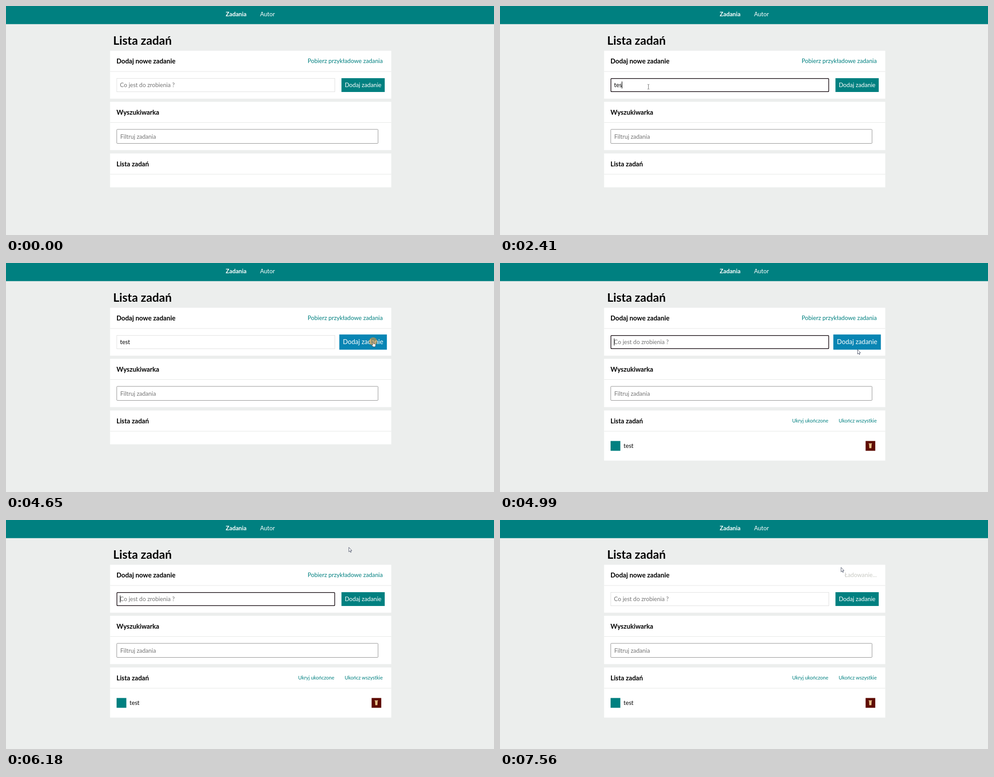
Write an HTML page that moves like this. It is 1090 px wide and 514 px high and loops after 8000 ms.

```html
<!DOCTYPE html>
<html lang="pl">
<head>
<meta charset="utf-8">
<title>Lista zadań</title>
<style>
html, body { margin: 0; width: 100%; height: 100%; overflow: hidden; background: #eceeed; }
svg { display: block; width: 100%; height: 100%; }
text { font: 13.2px Lato, sans-serif; white-space: pre; }
.nav { fill: #fff; }
.bold { font-weight: 700; }
.h1 { font-size: 26.5px; font-weight: 700; }
.h2 { font-size: 14.65px; font-weight: 700; }
.hint { font-size: 13.05px; fill: #757575; }
.end { text-anchor: end; }
.small { font-size: 11px; fill: #008080; text-anchor: end; }
.line { fill: #e4e6e5; }
</style>
</head>
<body>
<svg viewBox="0 0 1090 514">
  <rect width="1090" height="514" fill="#eceeed"/>
  <rect width="1090" height="40.7" fill="#008080"/>
  <text class="nav bold" x="490.8" y="23.2">Zadania</text>
  <text class="nav" x="567.5" y="23.2">Autor</text>
  <text class="h1" x="239.2" y="86.6">Lista zadań</text>

  <g fill="#fff">
    <rect x="232.5" y="100.5" width="628" height="107.5"/>
    <rect x="232.5" y="215" width="628" height="108.5"/>
    <rect id="panel" x="232.5" y="331" width="628"/>
  </g>
  <rect class="line" x="232.5" y="146.5" width="628" height="1"/>
  <rect class="line" x="232.5" y="261" width="628" height="1"/>
  <rect class="line" x="232.5" y="377" width="628" height="1"/>

  <text class="h2" x="246.8" y="129.2">Dodaj nowe zadanie</text>
  <text class="h2" x="246.8" y="243.8">Wyszukiwarka</text>
  <text class="h2" x="246.8" y="359.6">Lista zadań</text>
  <text id="link" class="end" x="841.5" y="128"></text>

  <rect id="field" fill="#fff"/>
  <text id="hint" class="hint" x="254.6" y="182">Co jest do zrobienia ?</text>
  <text id="typed" x="254.8" y="182"></text>
  <rect id="caret" y="169.5" width="1.2" height="15.5"/>

  <g id="button">
    <rect id="face" x="749.3" y="162" width="96.6" height="31"/>
    <text class="nav" x="797.6" y="182" text-anchor="middle">Dodaj zadanie</text>
  </g>

  <rect x="247.4" y="276.9" width="583.6" height="31.6" rx="1.5" fill="#fff" stroke="#808080" stroke-width=".9"/>
  <text class="hint" x="255.2" y="297.6">Filtruj zadania</text>

  <g id="item">
    <text class="small" x="733.3" y="357.6">Ukryj ukończone</text>
    <text class="small" x="841.5" y="357.6">Ukończ wszystkie</text>
    <rect x="247" y="399.5" width="21.8" height="22" fill="#008080"/>
    <text x="276" y="415.4">test</text>
    <rect x="816.6" y="399.5" width="21.6" height="22" fill="#5e0c02"/>
    <path d="M824.2 406h6l-.6 9.8h-4.8z" fill="#d9a866"/>
    <path d="M823.4 405.4h7.6M825.8 407l.3 8M828.6 407l-.3 8" stroke="#f6e3bd"/>
  </g>

  <circle id="press" r="9.2" fill="#f79628" fill-opacity=".53"/>
  <g id="pointer">
    <path id="arrow" d="M-.2 .4V10.4L2.1 8.3L3.7 11.7L5.1 11L3.6 7.7H6.6Z" fill="#fff" stroke="#27304a" stroke-width=".8"/>
    <path id="beam" d="M-2 -5H-.6L0 -4.4L.6 -5H2M0 -4.4V4.9M-2 5.5H-.6L0 4.9L.6 5.5H2" transform="translate(.5 0)" fill="none" stroke="#444" stroke-width=".8"/>
    <path id="hand" d="M-.8 .9Q0 -.3 .8 .9V5L5 6Q6 6.4 5.7 8L4.8 12H-.2L-3 8.3Q-3 6.8 -.8 8Z" fill="#fff" stroke="#333" stroke-width=".7"/>
  </g>
</svg>
<script>
const LOOP = 8000, STEP = 70, BLINK = 530, PRESS = 130;
const FOCUS = 1220, SUBMIT = 4590, ADDED = SUBMIT + PRESS, FETCH = 6740, LOADING = FETCH + PRESS;
const KEYS = [2150, 2210, 2410, 3400];
const TEAL = [0, 128, 128], LIT = [0, 141, 141], BLUE = [8, 133, 180], GREY = [200, 201, 195];

// each glide passes its points at even intervals
const glides = [
  { from: 250, gap: 233, points: [[938, 485], [580, 175], [270, 116], [331, 181]] },
  { from: 3460, gap: 210, points: [[331, 181], [390, 186], [546, 181], [762, 184], [820, 176]] },
  { from: 4920, gap: 210, points: [[820, 176], [715, 250], [448, 357], [262, 362], [206, 308],
    [480, 66], [766, 61], [785, 113], [757, 121]] },
  { from: 7420, gap: 140, points: [[757, 121], [762, 106]] }
];

const $ = id => document.getElementById(id);
const set = (id, attrs) => { for (const k in attrs) $(id).setAttribute(k, attrs[k]); };
const show = (id, on) => set(id, { visibility: on ? 'visible' : 'hidden' });
const glideAt = t => glides.filter(g => g.from <= t).pop() || glides[0];

// the picture moves on in whole steps
function sampled(t) {
  const { from } = glideAt(t);
  return from + Math.floor((t - from) / STEP) * STEP;
}

// Catmull-Rom through the points of the current glide
function locate(t) {
  const { from, gap, points } = glideAt(t);
  const last = points.length - 1;
  const s = Math.min(last, Math.max(0, (t - from) / gap));
  const i = Math.min(last - 1, Math.floor(s)), u = s - i;
  const at = n => points[Math.min(last, Math.max(0, n))];
  return [0, 1].map(c => {
    const [p, a, b, n] = [-1, 0, 1, 2].map(k => at(i + k)[c]);
    return a + u / 2 * (b - p + u * (2 * p - 5 * a + 4 * b - n + u * (3 * (a - b) + n - p)));
  });
}

// cubic-bezier(.25, .1, .25, 1)
function ease(x) {
  if (x <= 0) return 0;
  if (x >= 1) return 1;
  let lo = 0, hi = 1, s;
  for (let i = 0; i < 20; i++) {
    s = (lo + hi) / 2;
    if (.75 * s * (1 - s) + s ** 3 < x) lo = s; else hi = s;
  }
  return .3 * s * (1 - s) ** 2 + 3 * s * s * (1 - s) + s ** 3;
}
const fade = (t, from) => ease((t - from) / 500);
const mix = (a, b, k) => `rgb(${a.map((v, i) => Math.round(v + (b[i] - v) * k))})`;

function drawForm(t, q) {
  const focused = t >= FOCUS && t < SUBMIT || t >= ADDED && t < FETCH;
  const text = t < ADDED ? 'test'.slice(0, KEYS.filter(k => k <= t).length) : '';
  $('typed').textContent = text;
  show('hint', !text);
  set('field', focused
    ? { x: 247.7, y: 162.7, width: 486.6, height: 29.6, rx: 1.8, stroke: '#150a10', 'stroke-width': 1.5 }
    : { x: 247.5, y: 162.5, width: 487, height: 30, rx: 0, stroke: '#dedfde', 'stroke-width': 1 });

  const reset = [FOCUS, ...KEYS, ADDED].filter(k => k <= t).pop();
  show('caret', focused && Math.floor((t - reset) / BLINK) % 2 === 0);
  set('caret', { x: 254.5 + (text ? $('typed').getComputedTextLength() : 0) });

  const hover = fade(q, 4100) - fade(q, 4980);
  set('button', { transform: `translate(797.6 177.5) scale(${1 + .1 * hover}) translate(-797.6 -177.5)` });
  set('face', { fill: mix(TEAL, BLUE, hover) });
}

function drawList(t, q) {
  const loading = t >= LOADING;
  $('link').textContent = loading ? 'Ładowanie...' : 'Pobierz przykładowe zadania';
  set('link', { fill: loading ? mix(LIT, GREY, fade(q, LOADING - 40)) : mix(TEAL, LIT, fade(q, 6320)) });
  set('panel', { height: t >= ADDED ? 112.5 : 76 });
  show('item', t >= ADDED);
}

function drawPointer(t, q) {
  const [x, y] = locate(q);
  const inside = (l, top, r, b) => x > l && x < r && y > top && y < b;
  const seen = t >= glides[0].from;
  const beam = inside(247, 162, 735, 193);
  const hand = inside(749, 162, 846, 193) || t < LOADING && inside(673, 114, 842, 133);
  show('arrow', seen && !beam && !hand);
  show('beam', seen && beam);
  show('hand', seen && hand);
  set('pointer', { transform: `translate(${x.toFixed(1)} ${y.toFixed(1)})` });
  show('press', [FOCUS, SUBMIT, FETCH].some(p => t >= p && t < p + PRESS));
  set('press', { cx: x, cy: y });
}

const begin = performance.now();
function tick() {
  const t = (performance.now() - begin) % LOOP, q = sampled(t);
  drawForm(t, q);
  drawList(t, q);
  drawPointer(t, q);
  requestAnimationFrame(tick);
}
tick();
</script>
</body>
</html>
```
